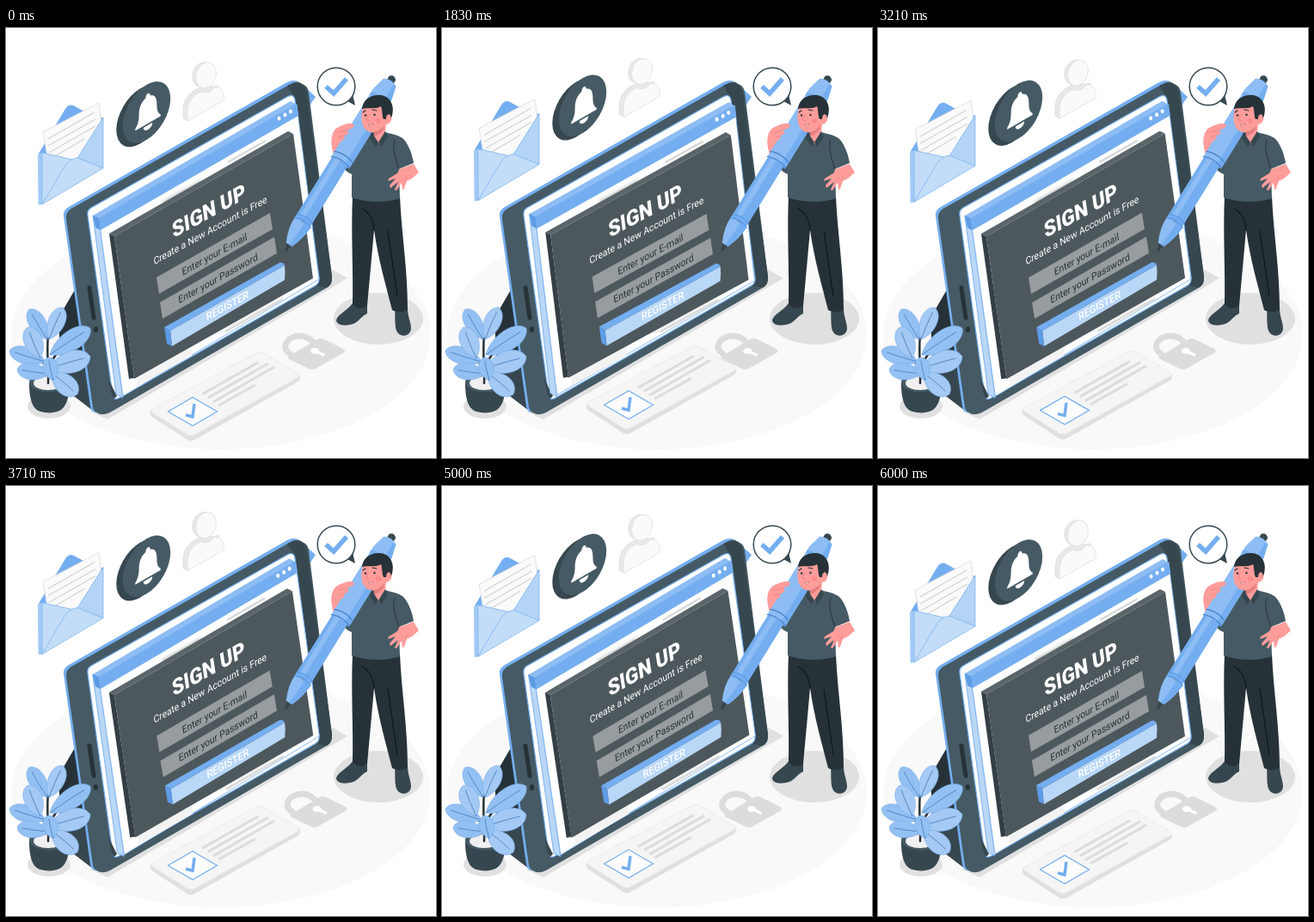
Animation, 500 px wide and 500 px high, one loop 6040 ms. Source, as an HTML page:

```html
<!DOCTYPE html>
<html lang="en">
<head>
<meta charset="utf-8">
<title>Sign up</title>
<style>
html, body { margin: 0; width: 100%; height: 100%; overflow: hidden; background: #fff; }
svg { display: block; width: 100vw; height: 100vh; }
text { font-family: Roboto, "Open Sans", sans-serif; text-anchor: middle; }
.ink { fill: #263238; }
.slate { fill: #37474f; }
.steel { fill: #455a64; }
.blue { fill: #74aef0; }
.soft { fill: #8dbdf4; }
.deep { fill: #5d9be6; }
.pale { fill: #b9d7f7; }
.grey { fill: #e0e0e0; }
.fog { fill: #f3f3f3; }
.snow { fill: #fafafa; }
.field { fill: #979c9f; }
.skin { fill: #ff9d9b; }
.line { fill: none; stroke-linecap: round; stroke-linejoin: round; }
.tick { fill: none; }
</style>
</head>
<body>
<svg viewBox="0 0 500 500" xmlns="http://www.w3.org/2000/svg">
  <!-- floor -->
  <ellipse cx="250" cy="356" rx="244" ry="134" fill="#f9f9f9"/>
  <ellipse class="grey" cx="433" cy="338" rx="52" ry="30"/>
  <path class="grey" d="M375 278 397 291 118 455 98 446Z"/>
  <ellipse class="grey" cx="50" cy="440" rx="25" ry="14"/>

  <g id="doc">
    <path class="grey" d="M168 445V449Q168 451 171 453L211 479Q215 481 219 479L340 411Q342 409 342 404Z"/>
    <path d="M170 443 291 378Q295 376 299 378L340 402Q343 404 340 406L219 473Q215 475 211 473L170 447Q167 445 170 443Z" fill="#f5f5f5" stroke="#e9e9e9" stroke-width=".8"/>
    <path d="M188.500 446 217 429.500 245.500 446 217 462.500Z" fill="#fcfcfc" stroke="#74aef0" stroke-width="1.200"/>
    <path class="tick" d="M209 450 217 452 219 437" stroke="#74aef0" stroke-width="3.500"/>
    <path d="M228 426 293 389M235 430 305 390M241 435 312 394M247 439 290 415" fill="none" stroke="#dcdcdc" stroke-width="3"/>
  </g>

  <g id="lock">
    <path class="line" d="M336 384 327 376C320 369 329 358 342 358 350 358 355 363 360 368" stroke="#dcdcdc" stroke-width="7"/>
    <path d="M330 381 362 362Q366 360 370 362L392 373Q396 376 392 378L360 396Q356 398 352 396L329 385Q326 383 330 381Z" fill="#dcdcdc"/>
    <ellipse cx="359" cy="375.500" rx="5" ry="3.500" fill="#fff"/>
    <path class="line" d="M360 376 369 380" stroke="#fff" stroke-width="3.500"/>
  </g>

  <!-- tablet -->
  <path class="ink" d="M82 301 61 337 64 400 74 424 104 447 110 420Z"/>
  <path class="slate" d="M72 390 74 424 104 447 98 400Z"/>
  <path class="blue" d="M67 219Q66 212 73 208L327 63Q335 59 341 63L360 80 112 440 104 447Q99 446 98 440Z"/>
  <path class="steel" d="M70 222Q69 214 76 210L331 65Q336 62 341 63L348 67Q351 69 352 75L379 289Q380 298 373 302L121 447Q113 451 107 448 102 446 101 441Z"/>
  <path class="slate" d="M327 67Q346 58 350 75L379 289Q380 298 373 302L360 300 334 78Z"/>
  <path d="M95 218Q94 212 99 209L327 80Q335 76 336 84L364 290Q365 297 359 300L132 430Q125 434 124 427Z" fill="#fff" stroke="#74aef0" stroke-width="1.200"/>
  <path class="slate" d="M119 408 129 428 126 431Q124 430 123 427Z"/>
  <path class="line" d="M97 302 102 337" stroke="#263238" stroke-width="5"/>
  <ellipse class="ink" cx="104.500" cy="350.500" rx="2.600" ry="3.400"/>

  <g id="win">
    <path class="pale" d="M101 218 108 222 136 430 128 426Z" stroke="#6ba5e8" stroke-width=".8"/>
    <path d="M108 222 338 89 364 292 136 428Z" fill="#fff" stroke="#74aef0" stroke-width=".8"/>
    <path class="fog" d="M180 200 228 173 231 190 182 218ZM150 389 215 351 216 381 153 417ZM245 333 310 296 312 319 248 356Z"/>
    <path d="M183 202 226 178M258 156 302 131M255 353 322 315" fill="none" stroke="#d9d9d9" stroke-width="2.500"/>
    <path class="soft" d="M101 218 331 85 338 89 108 222Z"/>
    <path class="blue" d="M108 221 338 88 340 102 110 235Z"/>
    <path class="deep" d="M101 218 108 221 110 235 104 232Z"/>
    <g fill="#fff"><ellipse cx="317.500" cy="105" rx="2" ry="2.600"/><ellipse cx="324.500" cy="101" rx="2" ry="2.600"/><ellipse cx="331" cy="97" rx="2" ry="2.600"/></g>

    <path fill="#5a656a" d="M120 239 328 120 334 123 126 242Z"/>
    <path fill="#343f45" d="M120 239 126 242 149 407 143 408Z"/>
    <path fill="#4d585d" d="M126 242 334 123 357 291 149 408Z"/>
    <path class="field" d="M175 290 307 215 310 234 178 309Z"/>
    <path class="field" d="M179 319 312 243 315 262 182 338Z"/>
    <path class="pale" d="M191 352 324 276Q325 284 324 293L193 370Z"/>
    <path class="blue" d="M184 348 318 273Q322 272 324 276L191 352Z"/>
    <path class="deep" d="M184 348 191 352 193 370 187 367Z"/>
    <g id="labels"></g>
  </g>

  <!-- plant -->
  <path class="slate" d="M27 413C27 430 30 443 40 446 47 448 56 448 62 445 71 441 74 427 74 412Z"/>
  <ellipse class="steel" cx="50.500" cy="412" rx="23.500" ry="11.500"/>
  <ellipse cx="49" cy="413" rx="17" ry="8" fill="#f0f0f0"/>
  <path class="line" d="M49 413C50 395 46 370 50 350M49 398 32 372M50 392 70 362" stroke="#263238" stroke-width="2.500"/>
  <g id="leaves"></g>

  <g id="mail">
    <path class="blue" d="M38 146 69 94Q73 88 78 90L91 97 113 105 110 150 42 165Z"/>
    <path class="snow" d="M43 121 108 87 112 118 82 153 49 156Z" stroke="#dcdcdc" stroke-width=".8"/>
    <path d="M49 129 103 98M49 137 104 106M50 145 104 114M52 152 91 129" fill="none" stroke="#d2d2d2" stroke-width="1.200"/>
    <path fill="#a3caf5" d="M37 147 42 145V205Q37 207 37.500 204Z"/>
    <g fill="#c3ddf8" stroke="#7db4f2" stroke-width=".8" stroke-linejoin="round">
      <path d="M42 145 77 153 42 205Z"/>
      <path d="M113 104 82 153 113 163Z" fill="#b4d4f6"/>
      <path d="M42 205 68 161Q74 152 83 151L113 163Z"/>
    </g>
  </g>

  <g id="bell">
    <circle class="slate" r="32" transform="matrix(.866 -.5 0 1 156 102.500)"/>
    <circle class="steel" r="32" transform="matrix(.866 -.5 0 1 163.500 98)"/>
    <g transform="matrix(.866 -.5 0 1 165 97)" fill="#fff">
      <path d="M0-21C2-21 3-19 3-17 10-15 12-9 12-2 12 6 14 9 17 12V14H-17V12C-14 9-12 6-12-2-12-9-10-15-3-17-3-19-2-21 0-21Z"/>
      <path d="M-6 16H6C6 23-6 23-6 16Z"/>
    </g>
  </g>

  <g id="user" stroke="#dcdcdc" stroke-width=".7">
    <path fill="#e8e8e8" d="M206 105V95C206 83 214 74 224 70L247 67 250 80 211 108Z"/>
    <ellipse fill="#e8e8e8" cx="229.500" cy="54.500" rx="12.500" ry="15" transform="rotate(18 229.500 54.500)"/>
    <path class="snow" d="M211 108V97C211 86 218 77 227 74 233 77 239 74 242 69 249 68 253.500 72 253.500 84Z"/>
    <ellipse class="snow" cx="232.500" cy="55" rx="11.500" ry="15.500" transform="rotate(18 232.500 55)"/>
  </g>

  <!-- shoes and trousers -->
  <path class="slate" d="M403 320C398 328 385 333 384 340 385 347 397 347 406 343 412 339 415 334 420 332V320ZM452 326C453 337 451 350 456 355 461 360 470 358 471 350 471 342 467 336 467 325Z"/>
  <path class="ink" d="M403 194C401 240 404 280 403 321 408 327 415 327 420 323L428 235C433 270 442 300 449 328 456 331 463 331 467 327 467 280 460 240 458 196Z"/>
  <path class="line" d="M428 235C427 222 422 214 414 210M444 236 455 312" stroke="#10181c" stroke-width="1.200"/>

  <!-- shirt -->
  <path class="steel" d="M424 121C416 124 409 129 405 138L391 158Q392 166 402 170L402 197C420 204 445 203 458 198L457 164 474 157C472 145 467 133 461 128 455 124 447 123 441 121Z"/>
  <path class="line" d="M452 130C449 138 452 150 457 164" stroke="#263238" stroke-width="1"/>

  <!-- pen, drawn along its own axis -->
  <path class="skin" d="M379 139C377 130 379 120 385 116 393 112 402 110 406 114L410 122 390 147 381 149Z"/>
  <g transform="translate(326 257) rotate(-58.300)">
    <path class="slate" d="M-2-1Q-4 1-1 2L10 3 10-4Z"/>
    <path class="soft" d="M6-4Q22-12 38-11L36 11Q20 10 6 4Z"/>
    <path class="blue" d="M6 0Q22 2 38 2L36 11Q20 10 6 4Z"/>
    <path class="blue" d="M35-11H121V10H35Q40 0 35-11Z"/>
    <path class="soft" d="M42-7H121V-1H42Z"/>
    <path class="line" d="M36-11Q41 0 36 11M41-11Q46 0 41 10" stroke="#5d9be6" stroke-width="1.300"/>
    <path class="slate" d="M228-4H234Q239 0 234 5H227Z"/>
    <path class="soft" d="M118-12H212L228-8Q233 0 228 9L212 13H118Q123 0 118-12Z"/>
    <path class="blue" d="M118 6H212L228 5 228 9 212 13H118ZM203-12Q208 0 203 13L207 13Q212 0 207-12Z"/>
    <path class="line" d="M119-12Q124 0 119 13M126-12Q131 0 126 13" stroke="#4c87d0" stroke-width="1.300"/>
  </g>
  <path class="skin" d="M380 122C386 114 398 109 404 112 407 114 402 118 395 119 400 120 400 124 393 125 395 129 392 132 386 131Z"/>
  <path class="line" d="M387 121 396 119M387 127 394 125" stroke="#e57f80" stroke-width=".8"/>

  <!-- open hand -->
  <path class="skin" d="M458 164 474 158 480 168 472 175 466 178 463 187 461 188 460 180 454 189 452 188 456 179 447 186 446 183 453 175 444 178 445 175 455 169 459 161Z"/>
  <path class="line" d="M459 178 462 174M464 178 466 173" stroke="#e57f80" stroke-width=".8"/>

  <!-- head -->
  <path class="skin" d="M415 92C412 103 413 114 419 119 422 121 426 122 430 121L427 128 434 135 441 123 442 112C448 111 450 105 447 100L437 88Z"/>
  <path d="M428 121C433 120 437 117 440 113L439 118C437 122 432 125 428 126Z" fill="#e57f80"/>
  <path class="ink" d="M414 94C415 83 424 77 436 78 448 80 453 92 448 105 447 98 442 99 442 106L439 106C437 102 438 97 436 91 430 95 420 92 414 94Z"/>
  <path class="slate" d="M425 121 433 133 430 138 423 129ZM441 120 444 127 436 138 433 133Z"/>
  <path class="line" d="M415 98 418 96M426 95 431 96" stroke="#263238" stroke-width="1.200"/>
  <g class="ink"><circle cx="418" cy="101.500" r="1.200"/><circle cx="428.500" cy="101" r="1.200"/></g>
  <path class="line" d="M421 101 419 107 422 108" stroke="#e57f80" stroke-width="1"/>
  <path d="M421 112Q424 113 427 111 426 114 424 114 422 114 421 112Z" fill="#fff" stroke="#b74f55" stroke-width=".6"/>
  <circle cx="433" cy="108" r="3" fill="#f77f82" opacity=".6"/>

  <!-- speech bubble -->
  <path class="slate" d="M395 84 406 90 403 77Z"/>
  <circle cx="384" cy="68" r="21.800" fill="#fff" stroke="#37474f" stroke-width="1.500"/>
  <path class="tick" d="M372 68 381 76 396 59" stroke="#74aef0" stroke-width="5.500"/>
</svg>
<script>
const NS = "http://www.w3.org/2000/svg";
const byId = id => document.getElementById(id);

function add(parent, tag, attrs, text) {
  const el = document.createElementNS(NS, tag);
  for (const k in attrs) el.setAttribute(k, attrs[k]);
  if (text) el.textContent = text;
  parent.append(el);
}

// Text lying in the plane of the panel: words, x, y, size, weight, colour
[
  ["SIGN UP", 237, 221, 25, 800, "#fff"],
  ["Create a New Account is Free", 238, 239, 11.5, 400, "#fff"],
  ["Enter your E-mail", 243, 267, 11.5, 400, "#263238"],
  ["Enter your Password", 247, 295, 11.5, 400, "#263238"],
  ["REGISTER", 258, 327, 12.3, 500, "#fff"]
].forEach(([words, x, y, size, weight, fill]) => add(byId("labels"), "text", {
  transform: `matrix(.875 -.485 .14 .99 ${x} ${y})`,
  "font-size": size, "font-weight": weight, fill
}, words));

// Leaves: base x, base y, tip x, tip y, half width
[
  [48, 362, 27, 327, 10], [50, 362, 66, 325, 10], [46, 388, 4, 375, 10],
  [40, 384, 25, 348, 11], [51, 380, 98, 349, 12], [50, 396, 98, 382, 13],
  [50, 402, 13, 397, 10], [53, 401, 83, 426, 12], [55, 410, 49, 383, 9]
].forEach(([x, y, tx, ty, w], i) => {
  const len = Math.hypot(tx - x, ty - y);
  const turn = Math.atan2(ty - y, tx - x) * 180 / Math.PI;
  const at = `translate(${x} ${y}) rotate(${turn})`;
  const bow = 1.3 * w;
  add(byId("leaves"), "path", {
    transform: at, fill: i % 2 ? "#a3c9f4" : "#93c0f2", stroke: "#74a9e6", "stroke-width": .5,
    d: `M0 0C${len * .3} ${-bow} ${len * .9} ${-bow} ${len} 0C${len * .9} ${bow} ${len * .3} ${bow} 0 0Z`
  });
  add(byId("leaves"), "path", {
    transform: at, fill: "none", stroke: "#4c80bd", "stroke-width": .8,
    d: `M0 0Q${len * .5} -1 ${len * .85} 0`
  });
});

// Linear keyframes: [position, value] pairs over one period
function track(keys, period, t) {
  const p = t % period / period;
  const i = Math.max(1, keys.findIndex(k => k[0] > p));
  const [a, u] = keys[i - 1], [b, v] = keys[i];
  return u + (v - u) * (p - a) / (b - a);
}
const FLOAT = [[0, 0], [.5, -10], [1, 0]];
const SWAY = [[0, 0], [.25, 1], [.75, -1], [1, 0]];
const SHAKE = [0, -1, 2, -4, 4, -4, 4, -4, 2, -1, 0].map((v, i) => [i / 10, v]);

const LOOP = 6040, FRAMES = 145, FPS = 24;
const start = performance.now();

function move(id, value) { byId(id).setAttribute("transform", value); }

function draw(now) {
  const t = Math.max(0, now - start) % LOOP;
  const step = Math.min(FRAMES - 1, Math.floor((t + 5) / LOOP * FRAMES));
  const ms = step * 1000 / FPS;
  const fast = track(FLOAT, 1500, ms), slow = track(FLOAT, 3000, ms);
  move("mail", `translate(0 ${fast})`);
  move("user", `translate(0 ${fast})`);
  move("bell", `translate(0 ${slow})`);
  move("doc", `translate(0 ${slow})`);
  move("lock", `translate(${track(SHAKE, 6000, ms)} 0)`);
  move("win", `rotate(${track(SWAY, 6000, ms)} 233 258)`);
  requestAnimationFrame(draw);
}
draw(start);
</script>
</body>
</html>
```
